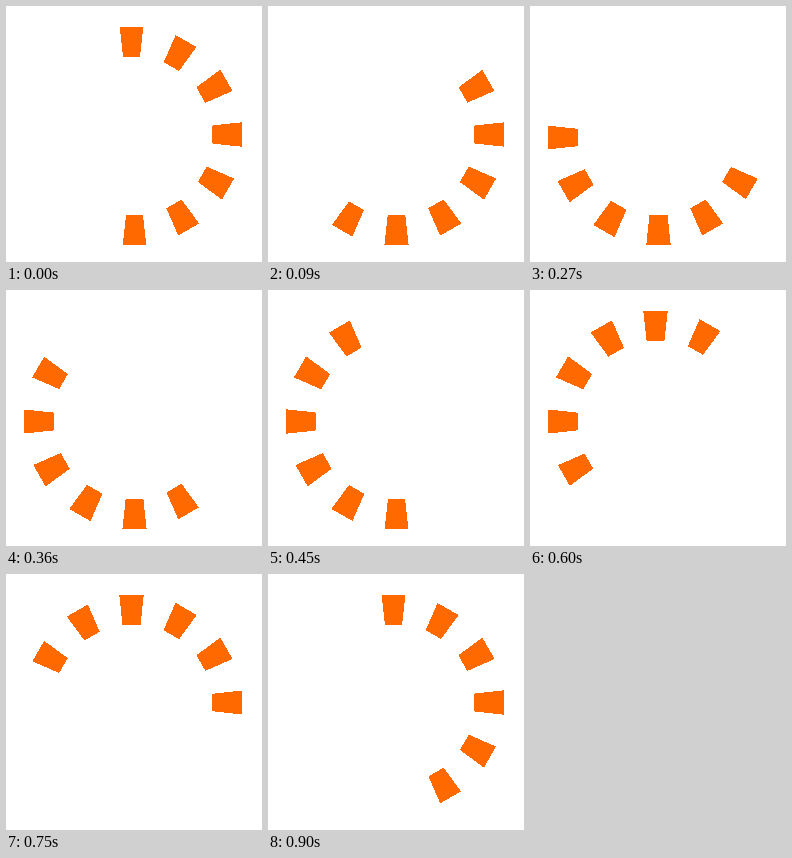
Animation, 256 px wide and 256 px high, one loop 0.93 s. Source, as an HTML page with a canvas:

```html
<!DOCTYPE html>
<html>
<head>
<meta charset="utf-8">
<style>
  html, body { margin: 0; height: 100%; overflow: hidden; background: #fff; }
  canvas { display: block; }
</style>
</head>
<body>
<canvas id="stage" width="256" height="256"></canvas>
<script>
const ctx = document.getElementById('stage').getContext('2d', { willReadFrequently: true });
const LOOP = 930, STEP = 30, COUNT = 12;
const CX = 127, CY = 130, SHIFT = -1.5;
const INNER = 79.1, OUTER = 108.9, INNER_HALF = 9, OUTER_HALF = 12.3;
const COLOR = [255, 105, 0];

// Triangle wave: 0 at phase 0, 1 at phase 0.5
const triangle = phase => 1 - Math.abs(2 * (phase - Math.floor(phase)) - 1);

function drawSegment(index, alpha) {
  ctx.save();
  ctx.globalAlpha = alpha;
  ctx.translate(CX, CY);
  ctx.rotate(index * 2 * Math.PI / COUNT);
  ctx.beginPath();
  ctx.moveTo(SHIFT - OUTER_HALF, -OUTER);
  ctx.lineTo(SHIFT + OUTER_HALF, -OUTER);
  ctx.lineTo(SHIFT + INNER_HALF, -INNER);
  ctx.lineTo(SHIFT - INNER_HALF, -INNER);
  ctx.fill();
  ctx.restore();
}

// Keep only pixels at least half opaque, giving hard edges
function harden() {
  const image = ctx.getImageData(0, 0, 256, 256), px = image.data;
  for (let i = 0; i < px.length; i += 4) {
    const on = px[i + 3] >= 127;
    px.set(COLOR, i);
    px[i + 3] = on ? 255 : 0;
  }
  ctx.putImageData(image, 0, 0);
}

function draw(time) {
  const t = Math.floor((time % LOOP) / STEP) * STEP / LOOP;
  ctx.clearRect(0, 0, 256, 256);
  ctx.fillStyle = `rgb(${COLOR})`;
  for (let i = 0; i < COUNT; i++) drawSegment(i, triangle(t - i / COUNT + 0.75));
  harden();
}

function frame() {
  draw(performance.now());
  requestAnimationFrame(frame);
}
frame();
</script>
</body>
</html>
```
